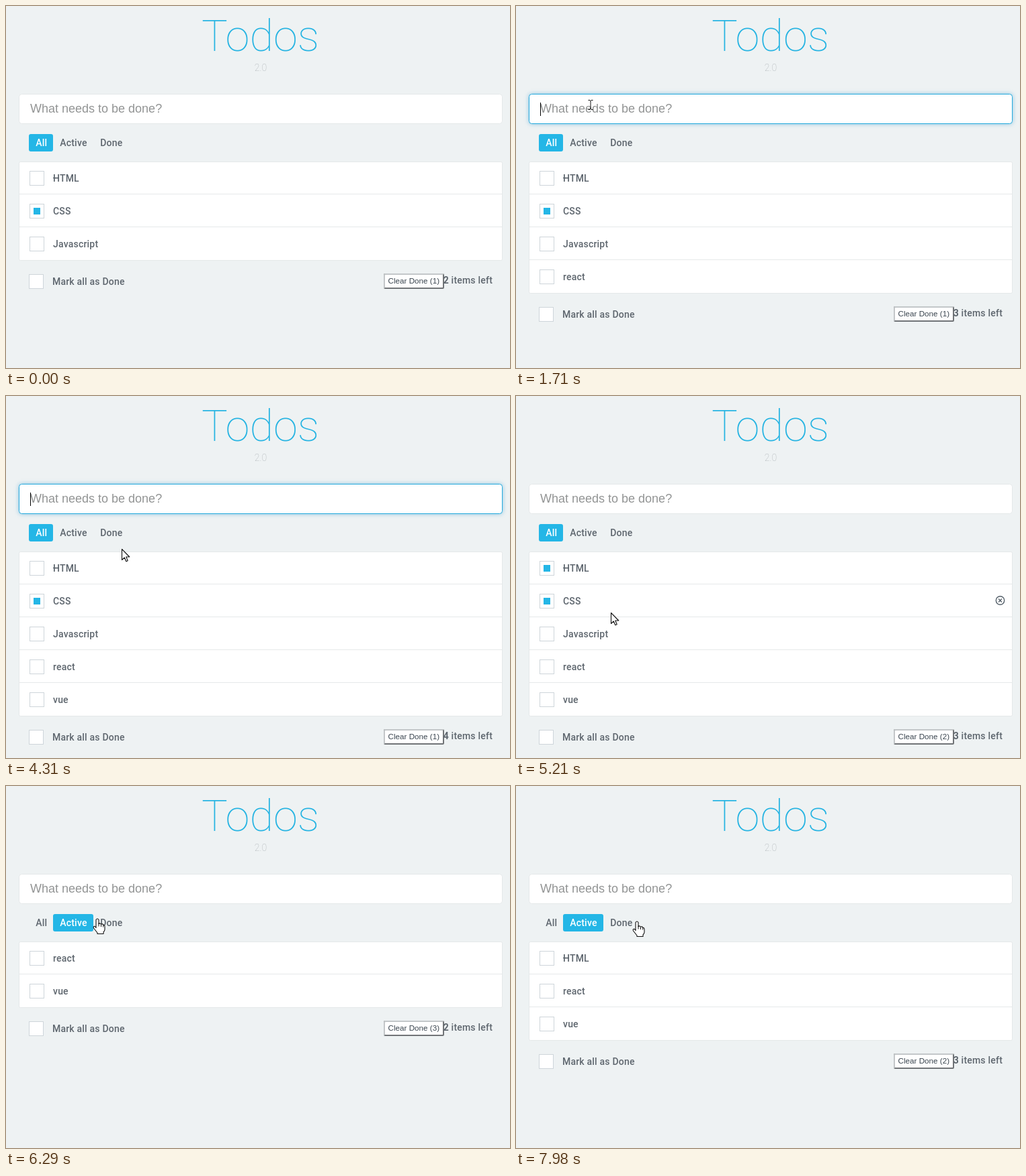
Recreate the animation shown at these times as an HTML page. Size 750x540 px, loop 8000 ms.

```html
<!DOCTYPE html>
<html lang="en">
<head>
<meta charset="utf-8">
<title>Todos</title>
<style>
  html, body { margin: 0; width: 100%; height: 100%; overflow: hidden; background: #eef2f3; }
  svg { display: block; }
  text { font: 500 14px Roboto, sans-serif; letter-spacing: .2px; fill: #5e666e; white-space: pre; }
  .title { font-size: 65px; font-weight: 100; letter-spacing: 0; fill: #24b3e2; text-anchor: middle; }
  .version { font-weight: 100; letter-spacing: 0; fill: #a9afb2; text-anchor: middle; }
  .input { font: 18px "Liberation Sans", Arial, sans-serif; letter-spacing: 0; fill: #333; }
  .placeholder { fill: #929494; }
  .button { font: 11.7px "Liberation Sans", Arial, sans-serif; letter-spacing: 0; fill: #3b4650; }
  .selected { fill: #fff; }
  .end { text-anchor: end; }
  .bold { font-weight: 700; }
  .panel { fill: #fff; stroke: #e4e8e9; }
  .box { fill: #fff; stroke: #ced5da; }
  .accent { fill: #24b6e6; }
  .rule { stroke: #e6e9ea; }
  .remove { fill: none; stroke: #55606a; stroke-width: 1.4; }
  .pointer { fill: #fff; stroke: #111; stroke-width: 1.1; stroke-linejoin: round; }
  .line { fill: none; stroke: #111; }
</style>
</head>
<body>
<svg width="750" height="540" viewBox="0 0 750 540">
  <text class="title" x="378.5" y="67">Todos</text>
  <text class="version" x="379" y="97">2.0</text>
  <g id="app"></g>
</svg>
<script>
const LOOP = 8000, LIST_TOP = 232, ROW = 49;
const app = document.getElementById('app');
const ruler = document.createElement('canvas').getContext('2d');
ruler.font = '18px "Liberation Sans", Arial, sans-serif';

// Moments of the user's actions
const FOCUS = 620, ADD_REACT = 1710, ADD_VUE = 3340, BLUR = 4520;
const typing = [
  [FOCUS, ''], [780, 'r'], [850, 're'], [990, 'rea'], [1070, 'reac'], [1210, 'react'],
  [ADD_REACT, ''], [3060, 'v'], [3130, 'vu'], [3200, 'vue'], [ADD_VUE, '']
];
const filters = [[0, 'All'], [5880, 'Active'], [6500, 'Done'], [7620, 'Active']];
const tabs = [['All', 34, 36], ['Active', 70, 60], ['Done', 130, 54]];

// Pointer path: time, x, y
const path = [
  [50, 150, 535], [280, 140, 330], [480, 116, 133], [600, 111, 147],
  [3660, 111, 147], [3960, 146, 186], [4310, 172, 228], [4450, 97, 268],
  [4900, 97, 268], [5210, 141, 323], [5390, 108, 352], [5510, 108, 352],
  [5720, 116, 222], [5840, 108, 194], [5990, 110, 199], [6150, 110, 199],
  [6290, 136, 198], [6440, 155, 194], [6560, 155, 196], [6960, 103, 247],
  [7130, 103, 247], [7450, 108, 211], [7580, 103, 213], [7820, 103, 213], [7980, 180, 202]
];

const clamp = v => Math.max(0, Math.min(1, v));
const latest = (list, t) => list.filter(entry => entry[0] <= t).pop();
const text = (x, y, body, cls = '') => `<text x="${x}" y="${y}" class="${cls}">${body}</text>`;
const rect = (x, y, w, h, cls, r = 0) =>
  `<rect x="${x}" y="${y}" width="${w}" height="${h}" rx="${r}" class="${cls}"/>`;
const checkbox = (x, y, checked) =>
  rect(x + .5, y + .5, 21, 21, 'box') + (checked ? rect(x + 6, y + 6, 10, 10, 'accent') : '');

function pointerAt(t) {
  if (t < path[0][0]) return null;
  const i = path.findIndex(p => p[0] > t);
  if (i < 0) return path.at(-1).slice(1);
  const [t0, x0, y0] = path[i - 1], [t1, x1, y1] = path[i];
  const k = (t - t0) / (t1 - t0), e = .5 * k + .5 * k * k * (3 - 2 * k);
  return [x0 + (x1 - x0) * e, y0 + (y1 - y0) * e];
}

function drawInput(t) {
  const focus = clamp((t - FOCUS) / 150) - clamp((t - BLUR) / 150);
  const [since, value] = latest(typing, t) || [0, ''];
  let out = rect(19.5, 131.5, 719, 44, 'panel', 4);
  if (focus > 0) {
    out += `<rect x="19.5" y="131.5" width="719" height="44" rx="4" fill="#fff" stroke="#24a9dc"
      opacity="${focus}" style="filter:drop-shadow(0 0 3px rgba(36,150,210,.5))"/>`;
  }
  out += value ? text(36, 159, value, 'input') : text(36, 159, 'What needs to be done?', 'input placeholder');
  const caretOn = t >= FOCUS && t < BLUR && Math.floor((t - since) / 340) % 2 === 0;
  if (caretOn) out += rect(36 + Math.round(ruler.measureText(value).width), 144, 1, 20, '');
  return out;
}

function drawTabs(filter) {
  return tabs.map(([name, x, w]) => {
    const on = name === filter;
    return (on ? rect(x, 191, w, 26, 'accent', 3) : '') + text(x + 10.2, 209, name, on ? 'selected' : '');
  }).join('');
}

function drawRow(item, i, hovered) {
  const y = LIST_TOP + i * ROW;
  let out = checkbox(35, y + 14, item.done) + text(70, y + 30, item.name);
  if (i) out += `<path class="rule" d="M20 ${y - .5}H738"/>`;
  if (item.name === 'HTML') out += `<path d="M70 ${y + 24.5}h9" stroke="#5e666e" stroke-width="1.4"/>`;
  if (hovered) {
    out += `<g class="remove" transform="translate(720.5 ${y + 24})"><circle r="6.2"/>
      <path d="M-2.4 -2.4 2.4 2.4M2.4 -2.4 -2.4 2.4"/></g>`;
  }
  return out;
}

function drawFooter(y, left, done) {
  return checkbox(34, y + 20, false) + text(69, y + 36, 'Mark all as Done') +
    rect(562, y + 19, 90, 23, 'accent', 2).replace('class="accent"', 'fill="#717477"') +
    `<path d="M562 ${y + 42}V${y + 21}q0 -2 2 -2H652l-2 2v19h-86z" fill="#c3c7c9"/>` +
    rect(564, y + 21, 86, 19, 'selected', 1) +
    text(568.5, y + 34, `Clear Done (${done})`, 'button') +
    text(724, y + 34, `<tspan class="bold">${left}</tspan> items left`, 'end');
}

function drawPointer([x, y], rows) {
  const rowY = (y - LIST_TOP) % ROW;
  const onInput = y > 131 && y < 176;
  const onTab = y > 191 && y < 217 && x > 34 && x < 184;
  const onLabel = y > LIST_TOP && y < LIST_TOP + rows * ROW && x > 35 && x < 112 && rowY > 12 && rowY < 40;
  let shape;
  if (onInput) {
    shape = '<path class="line" d="M-3.5 -6.5h2.5l1 1 1 -1h2.5M0 -6V7M-3.5 7.5h2.5l1 -1 1 1h2.5"/>';
  } else if (onTab || onLabel) {
    shape = `<path class="pointer" d="M-2 1.5Q0 -1.5 2 1.5V7.5Q4.3 6 5.5 8.2 7.8 7 8.7 9.3 11 9 11 12V16
      Q11 18 9 20V22.5H0V21L-5.5 14Q-6.5 11 -4 11.2L-2 13.5Z"/>
      <path class="line" d="M2 7v4.5M5.5 8v4M8.7 9v3.5"/>`;
  } else {
    shape = '<path class="pointer" d="M.5 .5V16.5L4.3 13 6.8 18.7 9.2 17.7 6.8 12H11.8Z"/>';
  }
  return `<g transform="translate(${Math.round(x)} ${Math.round(y)})">${shape}</g>`;
}

function render(t) {
  const items = [
    { name: 'HTML', done: t >= BLUR && t < 7050 },
    { name: 'CSS', done: true },
    { name: 'Javascript', done: t >= 5450 }
  ];
  if (t >= ADD_REACT) items.push({ name: 'react', done: false });
  if (t >= ADD_VUE) items.push({ name: 'vue', done: false });

  const filter = latest(filters, t)[1];
  const shown = items.filter(item => filter === 'All' || item.done === (filter === 'Done'));
  const done = items.filter(item => item.done).length;
  const pointer = pointerAt(t);
  const hovered = pointer ? Math.floor((pointer[1] - LIST_TOP) / ROW) : -1;
  const height = shown.length * ROW;

  app.innerHTML = drawInput(t) + drawTabs(filter) +
    rect(19.5, LIST_TOP + .5, 719, height, 'panel', 2) +
    shown.map((item, i) => drawRow(item, i, i === hovered)).join('') +
    drawFooter(LIST_TOP + height + 1, items.length - done, done) +
    (pointer ? drawPointer(pointer, shown.length) : '');
}

function tick() {
  render(performance.now() % LOOP);
  requestAnimationFrame(tick);
}
tick();
</script>
</body>
</html>
```
